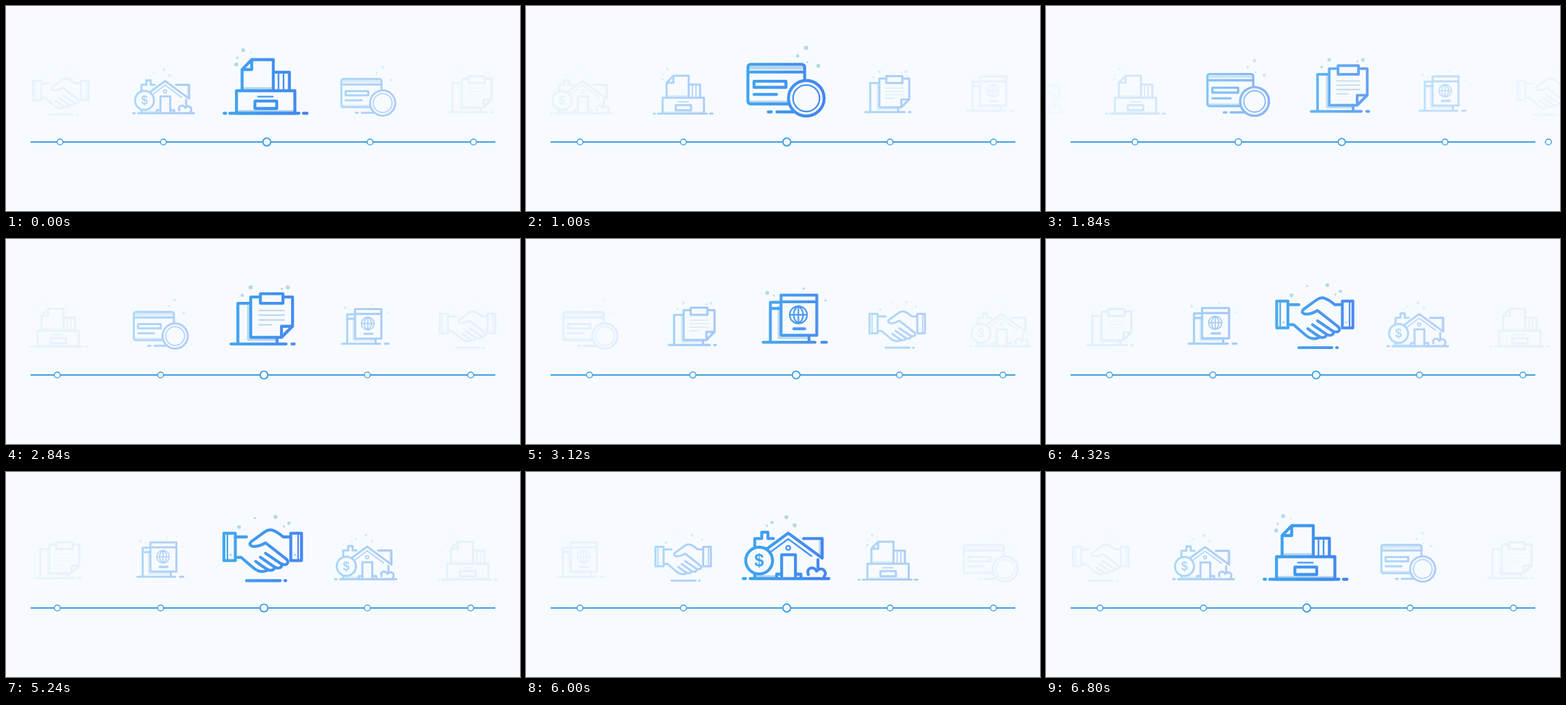
These frames come from a looping animation (750x300 px, 7.24 s). An HTML page:

```html
<!DOCTYPE html>
<html lang="en">
<head>
<meta charset="utf-8">
<title>Icon carousel</title>
<style>
  html, body { margin: 0; width: 100%; height: 100%; overflow: hidden; background: #f7fbff; }
  svg { display: block; width: 750px; height: 300px; }
  .icon path, .icon circle, .icon rect {
    fill: none; stroke: url(#blue); stroke-width: 4.3;
    stroke-linecap: round; stroke-linejoin: round;
  }
  .icon .thin { stroke-width: 2.3; }
  .icon .solid { fill: #f7fbff; }
  .icon .soft { stroke: #b5d5ea; stroke-width: 3; stroke-linecap: butt; }
  .icon .rule { stroke: #b5d5e8; stroke-width: 2; }
  .icon .speck { fill: #b8d6e8; stroke: none; }
  .icon text { font: bold 25px "Liberation Sans", Arial, sans-serif; fill: url(#blue); text-anchor: middle; }
  .stop { fill: #f9fcff; stroke: #3c9ee4; stroke-width: 1.9; }
</style>
</head>
<body>
<svg viewBox="0 0 750 300">
  <defs>
    <linearGradient id="blue" gradientUnits="userSpaceOnUse" x1="317" y1="0" x2="441" y2="0">
      <stop offset="0" stop-color="#3fa7ef"/>
      <stop offset="1" stop-color="#4583ef"/>
    </linearGradient>
  </defs>
  <rect width="750" height="300" fill="#f7fbff"/>
  <g id="icons"></g>
  <path d="M36 199H714" stroke="#3c9ee4" stroke-width="2"/>
  <g id="stops"></g>
</svg>
<script>
const LOOP = 7240, COUNT = 6, MID = 379, FLOOR = 159;

const path = (d, cls = '') => `<path class="${cls}" d="${d}"/>`;
const thin = d => path(d, 'thin');
const soft = d => path(d, 'soft');
const ring = (x, y, r, cls = '') => `<circle class="${cls}" cx="${x}" cy="${y}" r="${r}"/>`;
const box = (x, y, w, h, rx = 0, cls = '') =>
  `<rect class="${cls}" x="${x}" y="${y}" width="${w}" height="${h}" rx="${rx}"/>`;
const specks = (...list) => list.map(([x, y, r]) => ring(x, y, r, 'speck')).join('');

const files = [
  soft('M346 120.3H388M338 153.7H420'),
  path('M344.5 123V93L358.5 78.5H390V123M345 93H358.5V79M391 96.8H413.5V123'),
  thin('M397.6 98V122M405 98V122'),
  box(336.3, 124, 85.2, 33),
  thin('M367.5 132.6H389.5'),
  box(363.2, 139.2, 31.8, 10.8),
  path('M326.5 157H427.5M318.3 157H320.5M434 157H439.3'),
  specks([346, 64.6, 2.9], [357.6, 68.2, 1], [337.8, 75.7, 1.7], [336, 85.7, 2.9])
].join('');

const card = [
  `<path class="soft" style="stroke-width:5" d="M326 90.3H405"/>`,
  soft('M326 140H384'),
  box(323.8, 85.4, 82.8, 58, 4),
  path('M324 96.7H406'),
  box(332.7, 110.2, 46.6, 8.8),
  path('M332.7 129.4H365.5M353.5 155H358M366 155H390'),
  ring(409, 135, 26, 'solid'),
  ring(409, 135, 19.4, 'thin'),
  specks([408.8, 61.2, 3.1], [396.4, 73.2, 2.4], [410.5, 82.2, 1.5], [426.5, 87.6, 2.9])
].join('');

const clipboard = [
  soft('M353.5 96V147.3H394'),
  path('M338.4 153V93.6H355M396 146V152'),
  path('M371 84.3H357.3V143.8H402.5L418.8 127.5V84.3H405', 'solid'),
  path('M402.5 143.3V127.5H418.5Z', 'solid'),
  box(371.5, 79.4, 33.2, 14.2, 0, 'solid'),
  path('M369.5 104.2H406.5M369.5 111.2H406.5M369.5 118.2H406.5M369.5 125.2H388', 'rule'),
  path('M328.2 153.7H409.3M418 153.7H421.2'),
  specks([357.3, 70, 3], [345, 82, 2.4], [411.8, 70, 3], [403, 72.4, 1.8])
].join('');

const passport = [
  soft('M354.5 96V144.3H399'),
  path('M342 150V90.8H356M342 100H356M400 142V150'),
  box(358, 80, 53.6, 60.4, 0, 'solid'),
  path('M358 90H411M377 130.6H393.5'),
  ring(384, 109.6, 13, 'thin'),
  thin('M371 109.6H397M384 97V122.5M384 96.6C374.5 102 374.5 117 384 122.6C393.5 117 393.5 102 384 96.6'),
  path('M331.2 151H409M419 151H426'),
  specks([337.3, 76.7, 3], [347.4, 80.9, 1.4], [392, 70.2, 1.8], [424.6, 88.2, 1.8])
].join('');

const handshake = [
  box(317.8, 89, 16.8, 40.4),
  box(416.2, 89, 15.8, 40.4),
  thin('M323 90V128M427 90V128'),
  path('M336 94.5H351M336 124.5H343L361 140Q371 148.5 381 144'),
  path('M414 94.5H405Q396 86.5 388 84.2Q383 83.4 378 87L358.5 101Q353 106 360 108.4Q368 109.6 379 103.2L410 127.5Q414 132 410 134.7Q406 136.5 401 133.5L379 118.6'),
  path('M402.5 134.5Q404 140.5 396.5 140.5Q393.5 140 391 138L371.5 124.5M392.5 139Q392 144.5 384 143.5Q380 142 364.5 130.5'),
  path('M351 159H400.5M407.6 159H408.8'),
  specks([328, 121, 1.8], [422, 121, 1.8], [340, 80.1, 2.8], [363.4, 66.6, 1.6],
    [393.6, 65, 2.9], [413.3, 74.4, 2.5], [406, 79, 1.6])
].join('');

const house = [
  soft('M429 100V122M336 152.6H365'),
  path('M333.8 112V97.3H344V88.2H353V97.3H361M333.8 148V155'),
  path('M350 113.5L382.6 89.5L432.2 126V97.4H405'),
  thin('M355 118.5L382.6 98L416.5 123'),
  ring(382.6, 111, 3.1, 'thin speckled'),
  path('M373 153V121.2H393.2V153M365.7 155V149.5H373M393.2 149.5H401.2V155'),
  path('M426 128.5V140M412 150C408 140 420 137 424 145C431 137 441 146 435 153'),
  path('M327 156H442M317 156H320.2'),
  ring(340.2, 129.6, 19.6, 'solid'),
  '<text x="340.2" y="138">$</text>',
  specks([380, 66.1, 3], [359, 73.8, 2.4], [351.5, 78.6, 1.7], [392, 78, 2.9])
].join('');

// Each icon with the x that sits on its slot's axis
const icons = [[files, MID], [card, MID], [clipboard, 375.3], [passport, MID], [handshake, 375.3], [house, MID]];

const iconLayer = document.getElementById('icons');
const stopLayer = document.getElementById('stops');
iconLayer.innerHTML = icons.map(([art, x]) =>
  `<g class="icon"><g transform="translate(${MID - x})">${art}</g></g>`).join('');
stopLayer.innerHTML = '<circle class="stop" r="5.7"/>'.repeat(COUNT);

const mix = (a, b, k) => a + (b - a) * k;
const swing = k => 0.5 - Math.cos(Math.PI * Math.min(1, Math.max(0, k))) / 2;

// Slots travelled at time t
function travel(t) {
  let sum = 0;
  for (let i = 0; i < COUNT; i++) sum += swing((t - 399 - 1200 * i) / (i ? 400 : 600));
  return sum;
}

function fade(far) {
  if (far < 1) return mix(1, 0.4, far);
  if (far < 2) return mix(0.4, 0.08, far - 1);
  return mix(0.08, 0, far - 2);
}

function render(t) {
  const pos = travel(t);
  for (let i = 0; i < COUNT; i++) {
    const d = (i - pos + 3 + COUNT) % COUNT - 3;
    const far = Math.abs(d), near = Math.min(1, far);
    const icon = iconLayer.children[i];
    icon.setAttribute('transform',
      `translate(${MID + d * 149.4} ${FLOOR}) scale(${mix(1, 0.708, near)}) translate(${-MID} ${-FLOOR})`);
    icon.setAttribute('opacity', fade(far));
    stopLayer.children[i].setAttribute('transform',
      `translate(${380.5 + d * 150.8} 199) scale(${mix(1, 0.76, near)})`);
  }
}

const start = performance.now();
function tick() {
  render((performance.now() - start) % LOOP);
  requestAnimationFrame(tick);
}
tick();
</script>
</body>
</html>
```
